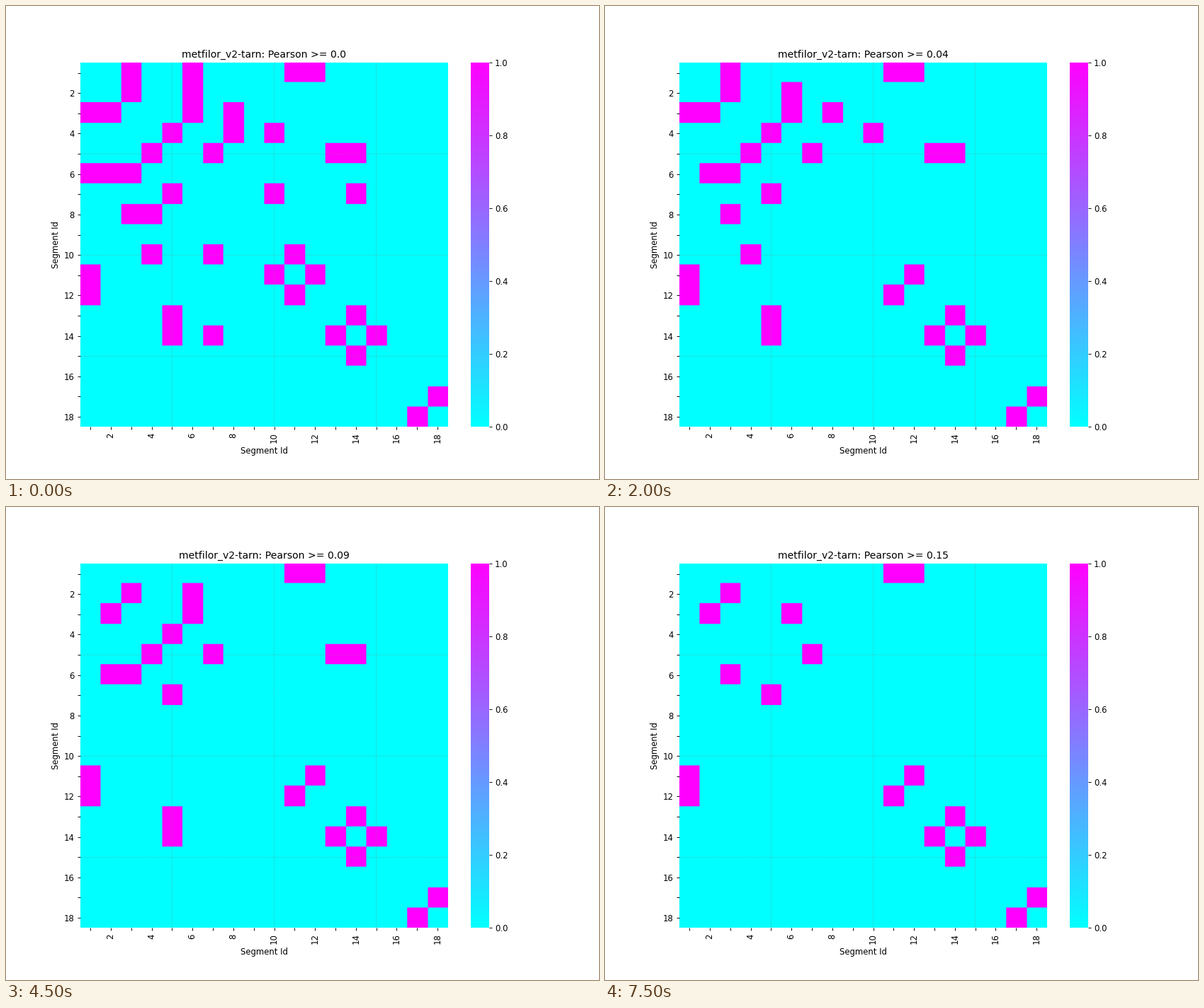
These frames come from a looping animation (837 by 669 pixels, 8000 ms). A matplotlib script:

```python
from itertools import pairwise

import numpy as np
import matplotlib.pyplot as plt
from matplotlib.animation import FuncAnimation

W, H = 837, 669
DPI = W / 10
N = 18
STEPS = 16
NAME = "metfilor_v2-tarn"

lost_at = np.zeros((N, N))


def link(path, steps=None):
    """Join neighbours along a path; each link is lost at its step."""
    pairs = list(pairwise(path))
    for (a, b), step in zip(pairs, steps or [STEPS] * len(pairs)):
        lost_at[a - 1, b - 1] = lost_at[b - 1, a - 1] = step


# Links that outlast the sweep.
link([1, 11, 12, 1])
link([2, 3, 6])
link([5, 7])
link(range(13, 16))
link([17, 18])
# One long walk that breaks up as the threshold rises, and two side links.
link([2, 6, 1, 3, 8, 4, 10, 7, 14, 5, 13], [15, 2, 5, 7, 1, 7, 4, 3, 12, 15])
link([4, 5], [12])
link([10, 11], [1])


def cell_of(size):
    return ((np.arange(size) + 0.5) * N / size).astype(int)


# Fine sampling with bilinear scaling gives soft cell edges.
GRID = np.ix_(cell_of(616), cell_of(620))


def matrix(step):
    return (lost_at > step).astype(float)[GRID]


plt.rcParams["font.family"] = "DejaVu Sans"
# The small margin keeps float truncation from losing a pixel.
fig, ax = plt.subplots(figsize=((W + 0.01) / DPI, (H + 0.01) / DPI), dpi=DPI)
heat = ax.imshow(matrix(0), cmap="cool", vmin=0, vmax=1, aspect="auto",
                 extent=(0, N, N, 0), interpolation="bilinear")
ax.set(xlabel="Segment Id", ylabel="Segment Id")

centers = np.arange(N) + 0.5
labels = [str(i) if i % 2 == 0 else "" for i in range(1, N + 1)]
ax.set_xticks(centers, labels, rotation=90)
ax.set_yticks(centers, labels)
ax.spines[:].set_visible(False)

for pos in np.arange(4.5, N, 5)[:3]:
    for draw in (ax.axvline, ax.axhline):
        draw(pos, color="gray", lw=0.5, ls=":", snap=False)

bar = fig.colorbar(heat, ax=ax)
bar.outline.set_linewidth(0)
title = ax.set_title("")


def update(step):
    heat.set_data(matrix(step))
    title.set_text(f"{NAME}: Pearson >= {step / 100}")
    return heat, title


anim = FuncAnimation(fig, update, frames=STEPS, interval=500,
                     repeat=True, repeat_delay=0, blit=False)
plt.show()
```
